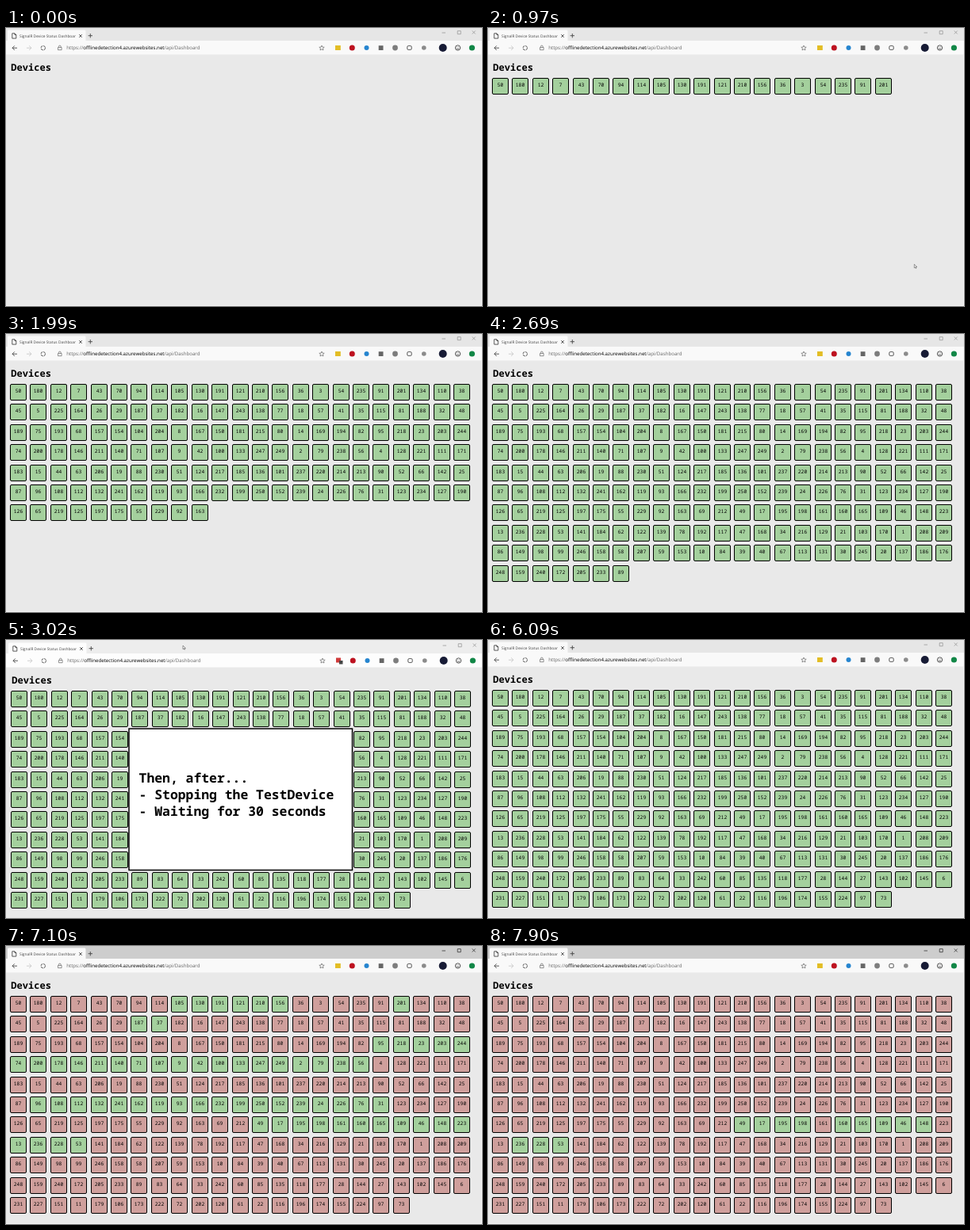
Recreate the animation shown at these times as an HTML page. Size 600 px wide and 351 px high, loop 8000 ms.

```html
<!DOCTYPE html>
<html lang="en">
<head>
<meta charset="utf-8">
<title>Device dashboard</title>
<style>
  html, body { margin: 0; width: 100%; height: 100%; overflow: hidden; background: #e9e9e9; }
  svg { display: block; width: 600px; height: 351px; text-rendering: geometricPrecision; }
  .ui { font-family: "Open Sans", "Noto Sans", sans-serif; }
  .mono, .cell { font-family: "Noto Sans Mono", "DejaVu Sans Mono", monospace; }
  .bold { font-weight: bold; }
  .line { fill: none; stroke: #333; stroke-width: .8; }
  .faint { stroke: #c4c4c4; }
  .grey { stroke: #777; }
  .strip { fill: #e6e6e6; }
  .bar { fill: #f9f9f9; }
  .controls { stroke: #999; }
  .active .strip { fill: #cdcdcd; }
  .active .controls { stroke: #333; }
  .slide .strip { fill: #ededed; }
  .slide .bar { fill: #fdfdfd; }
  .cell { font-size: 6.3px; text-anchor: middle; }
  .cell rect { fill: #a4d09d; stroke: #000; }
  .cell.off rect { fill: #cf9f9c; }
  .slideOnly, .slide .browserOnly { display: none; }
  .slide .slideOnly { display: inline; }
</style>
</head>
<body>
<svg id="stage" viewBox="0 0 600 351">
  <rect width="600" height="351" fill="#e9e9e9"/>
  <rect class="strip" width="600" height="17"/>
  <g id="page">
    <g class="ui">
      <path class="bar" d="M2 16.5V4q0-1.5 1.5-1.5H99q1.5 0 1.5 1.5v12.5z"/>
      <rect class="bar" x="-1" y="16" width="602" height="17.5"/>
      <path class="line" d="M7.8 6.8h3.2l1.8 1.8v4.5h-5zM11 6.8v1.8h1.8"/>
      <svg x="16" width="72" height="17"><text x="1" y="11.7" font-size="4.83" fill="#444">SignalR Device Status Dashboard</text></svg>
      <path class="line" d="M92.2 8.2l3.6 3.6m0-3.6l-3.6 3.6M103.6 9.7h5.4m-2.7-2.7v5.4"/>
      <path class="line controls" d="M549.5 6h4.5M569.2 3.7h4v4h-4zM587.7 3.5l4 4m0-4l-4 4"/>
      <path class="line" d="M14 25.2H8m2.8-2.8L8 25.2l2.8 2.8"/>
      <path class="line faint" d="M26 25.2h6m-2.8-2.8l2.8 2.8-2.8 2.8"/>
      <circle class="line" cx="46.8" cy="25.2" r="2.7" stroke-dasharray="3.3 .94"/>
      <path class="line grey" d="M65.5 24.5h4.6v3.2h-4.6zM66.4 24.5v-1a1.4 1.4 0 0 1 2.8 0v1"/>
      <text x="76.2" y="27.1" font-size="6.17" fill="#666">https://<tspan fill="#000">offlinedetection4.azurewebsites.net</tspan>/api/Dashboard</text>
      <path class="line grey" d="M398 22l.9 2.1 2.3.2-1.7 1.5.5 2.2-2-1.2-2 1.2.5-2.2-1.7-1.5 2.3-.2z"/>
      <rect class="browserOnly" x="415" y="22" width="6.8" height="6" fill="#e3bd25"/>
      <g class="slideOnly">
        <rect x="415" y="21.5" width="6" height="6" fill="#d03a3a"/>
        <rect x="419" y="25" width="4.5" height="4.5" fill="#444"/>
      </g>
      <circle cx="436.3" cy="25" r="3.5" fill="#bd1220"/>
      <circle cx="454.5" cy="25" r="3" fill="#2685cf"/>
      <rect x="469.7" y="22.2" width="5.8" height="5.8" fill="#666"/>
      <circle cx="490.5" cy="25" r="3.4" fill="#7d7d7d"/>
      <rect class="line" x="505.8" y="22.5" width="5.4" height="5" rx="1.5"/>
      <circle cx="526.8" cy="25" r="2.8" fill="#8b8b8b"/>
      <circle cx="550.7" cy="25" r="5" fill="#171b35"/>
      <g class="line">
        <circle cx="569.5" cy="25" r="3.2"/>
        <path d="M567.8 25.8q1.7 1.8 3.4 0M568.2 23.9h.7m1.2 0h.7"/>
      </g>
      <circle cx="587.4" cy="25" r="3.6" fill="#128747"/>
    </g>
    <text class="mono bold" x="6.3" y="53.8" font-size="12.1">Devices</text>
  </g>
  <path class="browserOnly" d="M599.5 33.5v317H0" fill="none" stroke="#f6f6f6"/>
  <g class="slideOnly mono bold" font-size="16.4">
    <rect x="155" y="112" width="281.5" height="178.5" fill="#fff" stroke="#000" stroke-width="1.5"/>
    <text x="167.6" y="180">Then, after...</text>
    <text x="167.6" y="200.9">- Stopping the TestDevice</text>
    <text x="167.6" y="221.8">- Waiting for 30 seconds</text>
  </g>
  <path id="cursor" d="M0 0v4.6l1.1-1 .8 1.6.7-.4-.7-1.5h1.5z" fill="#fff" stroke="#333" stroke-width=".5"/>
</svg>
<script>
  const LOOP = 8000, STEP = 78, COLS = 23, COUNT = 250, PITCH = 25.41;
  const SLIDE_IN = 3020, SLIDE_OUT = 6090, FOCUS = 6150;
  const stage = document.getElementById('stage');
  const page = document.getElementById('page');
  const cursor = document.getElementById('cursor');

  function add(parent, name, attrs) {
    const el = document.createElementNS('http://www.w3.org/2000/svg', name);
    for (const key in attrs) el.setAttribute(key, attrs[key]);
    return parent.appendChild(el);
  }

  // The first row has fixed ids, the remaining ids follow in seeded random order.
  function deviceIds() {
    const first = '50 180 12 7 43 70 94 114 105 130 191 121 210 156 36 3 54 235 91 201 134 110 38'.split(' ').map(Number);
    const rest = Array.from({ length: COUNT }, (_, i) => i + 1).filter(id => !first.includes(id));
    let seed = 7;
    for (let i = rest.length - 1; i > 0; i--) {
      seed = (seed * 16807) % 2147483647;
      const j = seed % (i + 1);
      [rest[i], rest[j]] = [rest[j], rest[i]];
    }
    return first.concat(rest);
  }

  const cells = deviceIds().map((id, i) => {
    const x = Math.round(5 + i % COLS * PITCH) + .5;
    const y = Math.round(63 + Math.floor(i / COLS) * PITCH) + .5;
    const g = add(page, 'g', { class: 'cell' });
    add(g, 'rect', { x, y, width: 20, height: 20, rx: 1.5 });
    add(g, 'text', { x: x + 10, y: y + 10.2 }).textContent = id;
    return g;
  });

  // Linear interpolation of column col between rows that start with a time.
  function track(keys, t, col = 1) {
    const n = keys.findIndex(k => k[0] > t);
    if (n < 1) return keys[n ? keys.length - 1 : 0][col];
    const a = keys[n - 1], b = keys[n];
    return a[col] + (b[col] - a[col]) * (t - a[0]) / (b[0] - a[0]);
  }

  const growth = [[499, 0], [500, 1], [970, 20], [1110, 20], [1890, 142], [1990, 149], [2220, 149], [2940, 250]];
  const pointer = [[730, 577, 268], [970, 537, 298.6], [1110, 537, 298.6], [1260, 520, 352]];

  // A run goes offline up to mid at once, then creeps on to last; updates come in pulses.
  const pulses = [6780, 6870, 7100, 7330, 7630];
  const runs = [
    { at: 6150, first: 14, mid: 32, last: 86, end: 7330 },
    { at: 6250, first: 233, mid: 249, last: 263, end: 7330 },
    { at: 6410, first: 87, mid: 105, last: 133, end: 7630 },
    { at: 6710, first: 134, mid: 148, last: 149, end: 6780 },
    { at: 6710, first: 165, mid: 197, last: 232, end: 7100 },
    { at: 7900, first: 160, mid: 161, last: 161 }
  ];
  const late = [19, 29, 30, 154];

  const offAt = Array(COUNT).fill(Infinity);
  for (const { at, first, mid, last, end } of runs) {
    for (let i = first; i <= last; i++) {
      const due = pulses[0] + (end - pulses[0]) * (i - mid) / (last - mid);
      offAt[i % COUNT] = i <= mid ? at : pulses.find(p => p >= due);
    }
  }
  late.forEach(i => offAt[i] = 7330);

  function draw(t) {
    const slide = t >= SLIDE_IN && t < SLIDE_OUT;
    stage.classList.toggle('slide', slide);
    stage.classList.toggle('active', t >= FOCUS);
    page.setAttribute('transform', slide ? 'translate(1 1)' : 'translate(0 0)');

    const tick = 500 + Math.floor((t - 500) / STEP) * STEP;
    const shown = Math.round(track(growth, tick));
    cells.forEach((cell, i) => {
      cell.style.display = i < shown ? '' : 'none';
      cell.classList.toggle('off', t >= offAt[i]);
    });

    const moving = t >= 730 && t < 1260;
    const x = slide ? 223 : track(pointer, tick, 1);
    const y = slide ? 7 : track(pointer, tick, 2);
    cursor.style.display = slide || moving ? '' : 'none';
    cursor.setAttribute('transform', `translate(${x} ${y})`);
  }

  const start = performance.now();
  function loop() {
    draw((performance.now() - start) % LOOP);
    requestAnimationFrame(loop);
  }
  loop();
</script>
</body>
</html>
```
